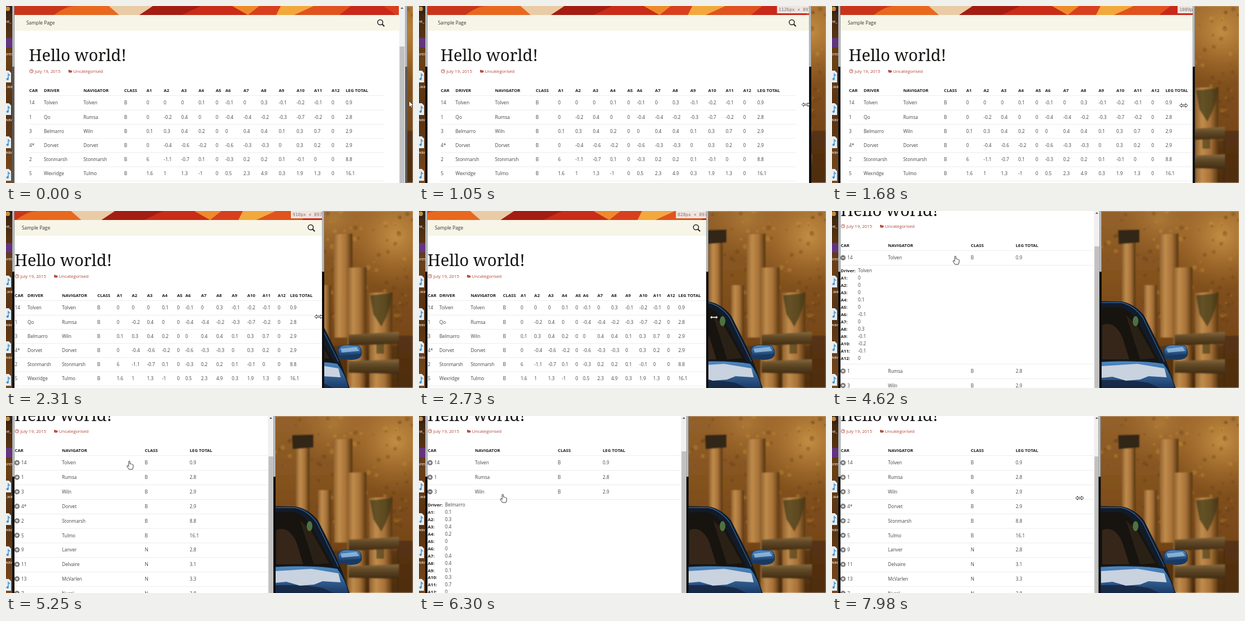
These frames come from a looping animation (720 by 315 pixels, 8 s). An HTML page:

```html
<!DOCTYPE html>
<html lang="en">
<head>
<meta charset="utf-8">
<title>Responsive table</title>
<style>
html, body { margin: 0; width: 100%; height: 100%; overflow: hidden; background: #fff; }
svg { display: block; width: 100%; height: 100%; }
text { font: 8.2px "Open Sans", "Noto Sans", sans-serif; fill: #444; white-space: pre; }
text.head { font-size: 7.7px; font-weight: 700; fill: #1b1b1a; }
text.meta { font-size: 7.8px; fill: #b04437; }
text.title { font: 29px "Noto Serif", serif; fill: #141412; }
text.nav { font-size: 8.4px; fill: #333; }
text.size { font: 7.9px "DejaVu Sans Mono", monospace; fill: #777; }
text.icon { font-size: 7px; fill: #fff; }
</style>
</head>
<body>
<svg viewBox="0 0 720 315" preserveAspectRatio="none">
  <defs>
    <linearGradient id="wall" x2="0" y2="1">
      <stop offset="0" stop-color="#95622c"/><stop offset=".35" stop-color="#84531f"/><stop offset=".7" stop-color="#774719"/><stop offset="1" stop-color="#55320f"/>
    </linearGradient>
    <radialGradient id="sun">
      <stop offset="0" stop-color="#d09a4a" stop-opacity=".8"/><stop offset="1" stop-color="#b87a30" stop-opacity="0"/>
    </radialGradient>
    <linearGradient id="post">
      <stop offset="0" stop-color="#8e602e"/><stop offset=".3" stop-color="#c08c4c"/><stop offset=".65" stop-color="#a87238"/><stop offset="1" stop-color="#54340f"/>
    </linearGradient>
    <linearGradient id="rail" x2="0" y2="1">
      <stop offset="0" stop-color="#84683f"/><stop offset=".4" stop-color="#604826"/><stop offset="1" stop-color="#3f2b12"/>
    </linearGradient>
    <linearGradient id="paint" x2="0" y2="1">
      <stop offset="0" stop-color="#4d8ac4"/><stop offset="1" stop-color="#1b3a66"/>
    </linearGradient>
    <linearGradient id="wood" x2="0" y2="1">
      <stop offset="0" stop-color="#3c220d"/><stop offset=".3" stop-color="#6b4018"/><stop offset=".6" stop-color="#553011"/><stop offset="1" stop-color="#7a4a1e"/>
    </linearGradient>
    <filter id="soft" x="0" y="0" width="1" height="1"><feGaussianBlur stdDeviation="1.2"/></filter>
    <clipPath id="view"><rect id="viewBox" x="15" width="691" height="315"/></clipPath>
  </defs>
  <g id="desk"></g>
  <g id="page" clip-path="url(#view)"></g>
  <g id="over"></g>
</svg>
<script>
const $ = id => document.getElementById(id);
const LOOP = 8000, STEP = 210;

const rect = (x, y, w, h, fill, more = '') =>
  `<rect x="${x}" y="${y}" width="${w}" height="${h}" fill="${fill}" ${more}/>`;
const path = (d, fill, more = '') => `<path d="${d}" fill="${fill}" ${more}/>`;
const disc = (x, y, r, fill, more = '') => `<circle cx="${x}" cy="${y}" r="${r}" fill="${fill}" ${more}/>`;
const text = (x, y, s, cls = '') => `<text x="${x}" y="${y + 2.9}" class="${cls}">${s}</text>`;

const rows = `14|Tolven|Tolven|B|0 0 0 0.1 0 -0.1 0 0.3 -0.1 -0.2 -0.1 0|0.9
1|Qo|Rumsa|B|0 -0.2 0.4 0 0 -0.4 -0.4 -0.2 -0.3 -0.7 -0.2 0|2.8
3|Belmarro|Wiln|B|0.1 0.3 0.4 0.2 0 0 0.4 0.4 0.1 0.3 0.7 0|2.9
4*|Dorvet|Dorvet|B|0 -0.4 -0.6 -0.2 0 -0.6 -0.3 -0.3 0 0.3 0.2 0|2.9
2|Stonmarsh|Stonmarsh|B|6 -1.1 -0.7 0.1 0 -0.3 0.2 0.2 0.1 -0.1 0 0|8.8
5|Wexridge|Tulmo|B|1.6 1 1.3 -1 0 0.5 2.3 4.9 0.3 1.9 1.3 0|16.1
9||Lanver|N||2.8
11||Delvaire|N||3.1
13||McVarlen|N||3.3
7||Nurel|N||3.8`.split('\n').map(line => {
  const [car, driver, nav, cls, legs, total] = line.split('|');
  return { car, driver, nav, cls, legs: legs.split(' '), total };
});
const legNames = Array.from({ length: 12 }, (_, i) => 'A' + (i + 1));
const wideHead = ['CAR', 'DRIVER', 'NAVIGATOR', 'CLASS', ...legNames, 'LEG TOTAL'];
const wideX = [0, 26, 96, 168, 207.5, 238, 269, 299.5, 330, 347, 379, 410, 441.5, 473, 504, 535, 560];
const slimHead = ['CAR', 'NAVIGATOR', 'CLASS', 'LEG TOTAL'];
const slimX = [0.5, 84, 230.5, 310];

// Keyframe tracks: [time, value, ...]
const edgeTrack = [[0, 706], [630, 706], [1050, 690], [1680, 638], [2100, 611], [2310, 559], [2730, 508], [3150, 473], [7770, 473], [7980, 471.5]];
const layoutTrack = [[0, 680], [630, 680], [1050, 675], [1680, 658], [2100, 600], [2310, 546], [3150, 448]];
const sizeTrack = [[0, 1150], [630, 1150], [1680, 1089], [2310, 910], [3150, 745]];
const mouseTrack = [[0, 713, 169], [420, 708, 174], [840, 705, 175], [1680, 622, 177], [2100, 596, 183], [2310, 553, 188],
  [3360, 475, 191], [3570, 469, 178], [4200, 217, 80], [5460, 217, 80], [6090, 147, 139], [7140, 147, 139], [7560, 475, 146], [7770, 472, 146], [7980, 438, 146]];

function at(track, t) {
  const i = track.findIndex(k => k[0] > t);
  if (i < 0) return track[track.length - 1].slice(1);
  const a = track[i - 1], b = track[i], u = (t - a[0]) / (b[0] - a[0]);
  return a.slice(1).map((v, n) => v + (b[n + 1] - v) * u);
}

function photo() {
  let seed = 7, s = rect(460, 0, 260, 315, 'url(#wall)') + disc(690, 45, 95, 'url(#sun)') + disc(580, 15, 70, 'url(#sun)', 'opacity=".5"');
  const rnd = () => (seed = seed * 16807 % 2147483647) / 2147483647;
  for (let i = 0; i < 130; i++)
    s += disc(470 + rnd() * 250, rnd() * 215, 1 + rnd() * 3.5, i % 3 ? '#5e3912' : '#d8a03c', 'opacity=".3"');
  s += rect(692, 222, 28, 93, '#4d2b10', 'opacity=".75"') + rect(575, 240, 120, 75, '#4a2c10', 'opacity=".6"');
  s += rect(513, 56, 24, 120, 'url(#post)') + path('M506 34L544 33V56L507 59Z', '#302514');
  s += rect(552, 132, 23, 110, 'url(#post)');
  s += path('M579 42L613 40V110L604 225H581Z', 'url(#post)') + path('M604 101L638 100L636 315H604Z', 'url(#post)');
  s += path('M642 146L684 144L682 315H643Z', 'url(#post)');
  s += path('M644 150L683 146L680 168L672 190L664 206L650 184Z', '#3f3a18', 'opacity=".7"') + rect(655, 236, 14, 18, '#3f3a18', 'opacity=".6"');
  s += path('M606 220L695 215V236L606 240Z', 'url(#rail)') + path('M606 267L695 264V290L606 288Z', 'url(#rail)');
  return `<g filter="url(#soft)">${s}</g>` + car();
}

function car() {
  return path('M460 160L512 161Q535 165 552 186L574 230Q590 262 598 286L608 315H460Z', '#111b2a')
    + path('M460 163L512 163Q534 168 550 190L588 268', 'none', 'stroke="#31608f" stroke-width="1.3"')
    + path('M460 172L510 171Q528 176 542 199L580 269Q530 263 460 267Z', '#17130f')
    + path('M478 203Q500 194 514 225L526 264H478Z', '#4a3320', 'opacity=".6"')
    + path('M520 185L540 205L572 262L545 264Z', '#32271a', 'opacity=".7"')
    + `<ellipse cx="537" cy="196" rx="5" ry="9" fill="#5d8a48" opacity=".8"/>`
    + path('M460 270Q540 264 586 272Q600 290 606 315H460Z', 'url(#paint)')
    + path('M460 302Q520 298 560 306L580 315H460Z', '#14243f', 'opacity=".8"')
    + path('M476 276L540 272L588 280L592 296L560 294L545 300L520 302L496 295L476 297Z', '#c9d2df')
    + path('M586 249Q588 238 603 238L622 239Q631 242 629 257Q624 266 608 265L588 262Z', '#173a63')
    + path('M588 248Q590 239 603 239L622 240Q629 243 627 254L590 258Z', 'url(#paint)')
    + path('M592 245L620 242L625 249L594 252Z', '#a9cdec', 'opacity=".7"');
}

function strip() {
  let s = rect(0, 0, 15, 315, 'url(#wood)') + rect(0, 0, 11, 13, '#30231a') + disc(3, 5, 4, '#c88a3a');
  s += rect(0, 57, 11, 17, '#63347f');
  for (const y of [115, 173, 232, 290])
    s += path(`M0 ${y}H5L9 ${y + 4}V${y + 21}H0Z`, '#e6edf3') + path(`M4 ${y + 15}V${y + 6}L7 ${y + 9}`, 'none', 'stroke="#3f8dc2" stroke-width="1.4"')
      + disc(2.8, y + 15, 2, '#3f8dc2');
  [['ne_', 27], ['pres', 85], ['t.wa', 143], ['wav', 202], ['wav', 260]].forEach(([n, y]) => s += text(-2, y, n, 'icon'));
  return s;
}

function banner(dx, width) {
  const shapes = [
    ['M0 0H110L85 16H0Z', '#c8351b'], ['M85 16Q105 0 125 0H190L200 16Z', '#e8681f'],
    ['M182 0H260L236 16H200Z', '#e9cba6'], ['M260 0H345L312 16H236Z', '#a41d13'],
    ['M345 0H405L428 16H312Z', '#c92c18'], ['M400 0H448L428 16Z', '#ee8a2a'],
    ['M486 0H545L510 16H478Z', '#f2a83c'], ['M545 0H610L590 16H510Z', '#e0531e'],
    ['M610 0H668L690 16H590Z', '#c8291a']];
  return rect(15, 0, width, 16, '#d83f1f') + `<g transform="translate(${dx})">${shapes.map(a => path(...a)).join('')}</g>`;
}

const line = (x, y, w) => rect(x, y, w, 1, '#ececea');

function wideTable(x, scale) {
  const put = (cells, y, cls) => cells.map((c, i) => text(x + wideX[i] * scale, y, c, cls)).join('');
  let s = put(wideHead, 150, 'head') + line(x, 159, 628 * scale);
  rows.slice(0, 6).forEach((r, i) => {
    const y = 172.5 + i * 25.2;
    s += put([r.car, r.driver, r.nav, r.cls, ...r.legs, r.total], y) + line(x, y + 12.3, 628 * scale);
  });
  return s;
}

function toggle(y, open) {
  return disc(19.5, y, 4.6, '#777') + rect(17, y - .6, 5, 1.2, '#fff') + (open ? '' : rect(18.9, y - 2.5, 1.2, 5, '#fff'));
}

function slimTable(width, open) {
  const col = i => 15 + slimX[i] * width / 448;
  let y = 83.5;
  let s = slimHead.map((h, i) => text(col(i), 61, h, 'head')).join('') + line(15, 70, width);
  rows.forEach((r, i) => {
    s += toggle(y - .3, i === open) + text(27, y, r.car);
    [r.nav, r.cls, r.total].forEach((c, n) => s += text(col(n + 1), y, c));
    s += line(15, y + 12.8, width);
    if (i === open) {
      ['Driver', ...legNames].forEach((n, k) => {
        const ky = y + 23 + k * 12.94;
        s += text(15.5, ky, n + ':', 'head') + text(46, ky, k ? r.legs[k - 1] : r.driver);
      });
      y += 175.7;
      s += line(15, y + 12.8, width);
    }
    y += 25.83;
  });
  return s;
}

function heading(x, y) {
  const red = '#b04437';
  return `<text x="${x - .5}" y="${y - 18}" class="title">Hello world!</text>`
    + disc(x + 4, y, 3.1, 'none', `stroke="${red}" stroke-width=".9"`) + path(`M${x + 4} ${y - 2}v2h1.6`, 'none', `stroke="${red}" stroke-width=".8"`)
    + text(x + 10, y, 'July 19, 2015', 'meta')
    + path(`M${x + 69.5} ${y + 2.3}v-4.6h2.2l.9 .9h2.6v1.1h-3.4z`, red) + path(`M${x + 69.9} ${y + 2.5}l1.6-2.7h5l-1.5 2.7z`, red)
    + text(x + 78, y, 'Uncategorised', 'meta');
}

function scrollbar(x, top) {
  return rect(x, 0, 11, 315, '#f0f0f0') + path(`M${x + 2.5} 5l2.5-3l2.5 3z`, '#555') + rect(x + .8, top, 8.6, 315 - top, '#c1c1c1');
}

const cursors = {
  arrow: path('M0 0V11L2.6 8.7L4.4 12.6L6.2 11.8L4.5 8H8Z', '#fff', 'stroke="#222" stroke-width=".8"'),
  resize: path('M-7 0L-3.6-3.4V-1.2H3.6V-3.4L7 0L3.6 3.4V1.2H-3.6V3.4Z', '#fff', 'stroke="#222" stroke-width=".9"'),
  hand: path('M0 1Q1.2-.6 2.3 1V5.3Q3.4 4.5 4.4 5.7Q5.6 5 6.4 6.3Q8 6 8 7.6V11L6.6 15H.6L-3 9.6Q-2.8 7.4-1 8.6L0 9.6Z', '#fff', 'stroke="#222" stroke-width=".9"')
};

function draw(t) {
  const [edge] = at(edgeTrack, t), [width] = at(layoutTrack, t), [size] = at(sizeTrack, t), [mx, my] = at(mouseTrack, t);
  const slim = t >= 2940;
  const open = t >= 4620 && t < 5250 ? 0 : t >= 6300 && t < 7140 ? 2 : -1;
  const left = Math.max(15.5, 15 + (width - 628) / 2);

  $('viewBox').setAttribute('width', edge - 15);
  let s = rect(15, 0, 700, 315, '#fff');
  if (slim) {
    s += heading(15.5, 27) + slimTable(width, open);
  } else {
    const sx = Math.min(15 + width / 2 + 308, width - 6);
    s += banner(15 + (width - 680) / 2 - 15, width) + rect(15, 16, width, 28, '#f7f5e7')
      + text(Math.max(28, 36 + (width - 680) / 2), 30, 'Sample Page', 'nav')
      + disc(sx - 1, 29, 4.6, 'none', 'stroke="#222" stroke-width="1.5"') + path(`M${sx + 2.3} 32.3l4 4`, 'none', 'stroke="#222" stroke-width="2"')
      + heading(left, 116) + wideTable(left, Math.min(1, width / 628));
  }
  s += scrollbar(15 + width + .5, open < 0 ? 72 : 63);
  if (t >= 840 && t < 3990) {
    const lx = 408 + (size - 745) * .6;
    s += rect(lx - 3, 0, 70, 13, '#f3f2f0', 'opacity=".92"') + text(lx, 6, `${Math.round(size)}px × 897px`, 'size');
  }
  $('page').innerHTML = s;

  const low = t < 420 ? '#5c5a58' : '#0e0e0f';
  const kind = t >= 420 && t < 3570 || t >= 7560 ? 'resize' : mx < 463 ? 'hand' : 'arrow';
  const side = (x, lit) => rect(x, 0, 4, 108, '#8f9295') + rect(lit, 0, 1.4, 108, '#d8dadc') + rect(x, 108, 4, 207, low);
  $('over').innerHTML = side(11, 12) + side(edge, edge + 1)
    + `<g transform="translate(${mx} ${my})">${cursors[kind]}</g>`;
}

$('desk').innerHTML = photo() + strip();
const start = performance.now();
let last = -1;
function tick() {
  const step = Math.floor((performance.now() - start) % LOOP / STEP);
  if (step !== last) draw((last = step) * STEP);
  requestAnimationFrame(tick);
}
tick();
</script>
</body>
</html>
```
